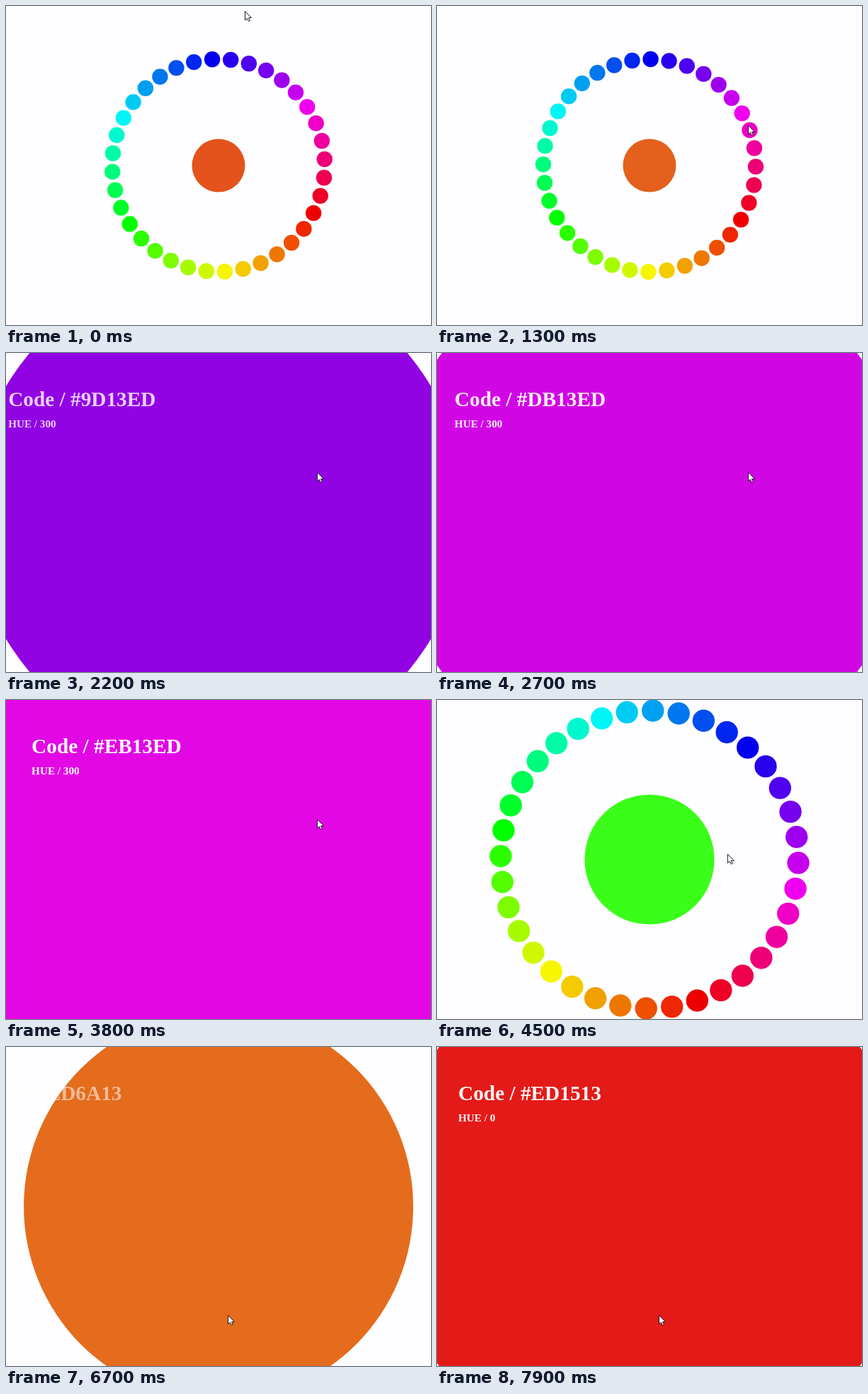
Recreate the animation shown at these times as an HTML page with a canvas. Size 600 px wide and 450 px high, loop 8000 ms.

```html
<!DOCTYPE html>
<html lang="en">
<head>
<meta charset="utf-8">
<title>Hue wheel</title>
<style>
  html, body { margin: 0; width: 100%; height: 100%; overflow: hidden; background: #fefdff; }
  canvas { display: block; }
</style>
</head>
<body>
<canvas id="stage" width="600" height="450"></canvas>
<script>
const ctx = document.getElementById('stage').getContext('2d');
const LOOP = 8000, STEP = 100;
const OPEN = 1368, CLOSE = 3905, REOPEN = 6305;   // clicks
const CX = 300, CY = 225, FULL = 375;
const SPIN = 3.08;                                // degrees per second
const SERIF = '"Liberation Serif", "Times New Roman", serif';
const ARROW = new Path2D('M0 0V12.5L2.8 9.9L4.8 14L6.9 13.1L5 9.2H9Z');

const rad = deg => deg * Math.PI / 180;
const mix = (a, b, k) => a + (b - a) * k;

// Red, green and blue of a hue whose channels run from low to high
const rgb = (hue, low, high) => [5, 3, 1].map(n => {
  const k = (n + hue / 60) % 6;
  return Math.floor(high - (high - low) * Math.max(0, Math.min(k, 4 - k, 1)));
});

// Screen colour: greens come out brightest
function tint(hue, low, high) {
  const glow = (255 - high) * Math.max(0, Math.cos(rad(hue - 120)));
  return `rgb(${rgb(hue, low, high + glow)})`;
}

const diskTint = hue => tint(hue, 16 + 16 * Math.cos(rad(hue - 60)), 228);

const hexCode = hue =>
  '#' + rgb(hue, 19, 237).map(c => c.toString(16).padStart(2, '0')).join('').toUpperCase();

// How far the page is open, 0 to 1, for a given time constant
function opened(t, tau) {
  if (t < OPEN) return 0;
  if (t < CLOSE) return 1 - Math.exp((OPEN - t) / tau);
  if (t < REOPEN) return Math.exp((CLOSE - t) / tau);
  return 1 - Math.exp((REOPEN - t) / tau);
}

function idleHue(t) {
  return t < CLOSE
    ? 16.6 + SPIN * Math.min(t, OPEN) / 1000
    : 79 + SPIN * (Math.min(t, REOPEN) - 5600) / 1000;
}

function circle(x, y, r, fill) {
  ctx.fillStyle = fill;
  ctx.beginPath();
  ctx.arc(x, y, r, 0, 2 * Math.PI);
  ctx.fill();
}

function drawRing(t, open) {
  const scale = 1 + 2.5 * open, r = 150 * scale;
  const turn = 26.6 + SPIN * t / 1000 + (t > 3000 ? 30.85 : 0);
  for (let hue = 0; hue < 360; hue += 10) {
    const a = rad(hue + turn);
    circle(CX + r * Math.cos(a), CY + r * Math.sin(a), 11.2 * scale, tint(hue, 0, 238));
  }
}

function drawLabel(t, hue, target) {
  const shown = opened(t, 500), x = mix(-144, 37.5, shown);
  ctx.fillStyle = `rgba(255,255,255,${shown})`;
  ctx.font = `bold 29.3px ${SERIF}`;
  ctx.fillText('Code / ' + hexCode(hue), x, 75);
  ctx.font = `bold 15.2px ${SERIF}`;
  ctx.fillText('HUE / ' + target, x, 105);
}

// Smooth progress of a move between two times
function glide(t, from, to) {
  const k = Math.min(1, Math.max(0, (t - from) / (to - from)));
  return k * k * (3 - 2 * k);
}

function drawCursor(t) {
  const a = glide(t, 0, 1200), b = glide(t, 4200, 5200), c = glide(t, 5700, 6200);
  const x = 337 + 102 * a + 63 * Math.sin(Math.PI * a) - 135 * b + 9 * c;
  const y = 7 + 161 * a + 227 * b - 17 * c;
  ctx.save();
  ctx.translate(x + 0.5, y + 0.5);
  ctx.fillStyle = '#fff';
  ctx.strokeStyle = '#1c1424';
  ctx.fill(ARROW);
  ctx.stroke(ARROW);
  ctx.restore();
}

function draw(now) {
  const t = Math.floor(now % LOOP / STEP) * STEP;
  const open = opened(t, 325);
  const target = t < REOPEN ? 300 : 0;
  const hue = mix(idleHue(t), target ? 299.7 : 0, open);
  ctx.fillStyle = '#fefdff';
  ctx.fillRect(0, 0, 600, 450);
  drawRing(t, open);
  circle(CX, CY, mix(37.5, FULL, open), diskTint(hue));
  drawLabel(t, hue, target);
  drawCursor(t);
}

const start = performance.now();
function loop() {
  draw(performance.now() - start);
  requestAnimationFrame(loop);
}
loop();
</script>
</body>
</html>
```
